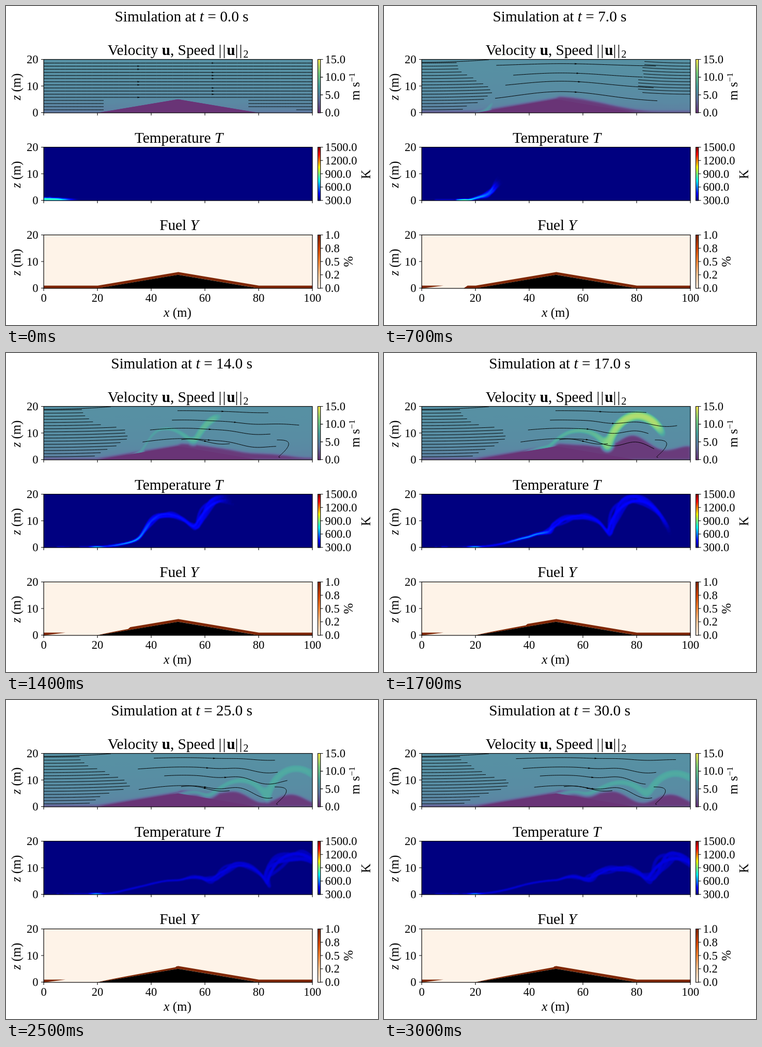
Write an HTML page with a canvas that moves like this. It is 720 by 618 pixels and loops after 3100 ms.

```html
<!DOCTYPE html>
<html lang="en">
<head>
<meta charset="utf-8">
<title>Fire simulation</title>
<style>
html, body { margin: 0; width: 100%; height: 100%; overflow: hidden; background: #fff; }
canvas, svg { position: absolute; left: 0; top: 0; width: 720px; height: 618px; }
text { font: 22.5px "Liberation Serif", "Times New Roman", serif; }
.big { font-size: 29.3px; }
.unit { font-size: 25px; }
.it { font-style: italic; }
.bold { font-weight: bold; }
.bars { letter-spacing: 2px; }
</style>
</head>
<body>
<canvas id="view" width="720" height="618"></canvas>
<svg id="chart" viewBox="0 0 720 618" text-anchor="middle"></svg>
<script>
const L = 73, W = 520, H = 103, TOPS = [104, 274, 444], STEP = 100, STEPS = 31;
const MAPS = {
  viridis: [[68, 1, 84], [59, 82, 139], [33, 145, 140], [94, 201, 98], [253, 231, 37]],
  jet: [[0, 0, 128], [0, 0, 255], [0, 128, 255], [0, 255, 255], [128, 255, 128],
        [255, 255, 0], [255, 128, 0], [255, 0, 0], [128, 0, 0]],
  oranges: [[254, 243, 232], [253, 208, 162], [253, 141, 60], [217, 72, 1], [127, 39, 4]]
};

const clamp = (v, a = 0, b = 1) => Math.min(b, Math.max(a, v));
const mix = (a, b, f) => a + (b - a) * f;
const smooth = v => (v = clamp(v), v * v * (3 - 2 * v));
const bell = (v, mid, width) => Math.exp(-(((v - mid) / width) ** 2));
const rand = (...seed) => {
  const v = Math.sin(seed.reduce((s, n) => s * 7.13 + n * 12.99, 1)) * 43758.5;
  return v - Math.floor(v);
};
// metres to panel pixels
const px = x => x * W / 100, py = z => H - z * H / 20;

function shade(map, v) {
  const n = map.length - 1, i = Math.min(v * n | 0, n - 1);
  return map[i].map((c, j) => mix(c, map[i + 1][j], v * n - i));
}

// --- Model, in metres and seconds ---
const hill = x => 5.1 * clamp(1 - Math.abs(x - 50) / 30);
const fireFront = t => Math.min(3 * t, 4 + 1.7 * t + .022 * t * t, 49.3);
const source = t => Math.min(20, 2 + 2 * t);
const plumeTip = t => 3.4 + 3.23 * t + .103 * t * t;
const phase = (x, t) => 2 * Math.PI * (x - 76 - 4.5 * (t - 21)) / 22;

// A travelling wave grows downwind of the fire front and rolls over
function plume(x, t) {
  const d = x - fireFront(t);
  const young = 1 - smooth((t - 13) / 8);
  const amp = (2.6 * smooth(d / 12) + 4 * smooth((d - 18) / 25)) * (1 - .4 * smooth((t - 22) / 8));
  const rise = (2.2 + 3 * young) * smooth(d / 12) + 2 * smooth((d - 12) / 30);
  const p = phase(x, t);
  return {
    d, x: x + amp * .6 * Math.sin(p),
    z: .2 + 5.2 * smooth((x - 20) / 30) + rise + amp * Math.cos(p)
  };
}

function heat(x, t) {
  const fire = .2 * bell(x, fireFront(t), 7) * (1 - smooth((t - 20) / 4));
  const base = mix(.2, .095, clamp(t / 24));
  return (base + fire + .28 * bell(x, source(t), 2.2)) * smooth((plumeTip(t) - x) / 4);
}

function jet(x, t) {
  const d = x - fireFront(t), gust = bell(t, 17, 3);
  const speed = .38 + .14 * smooth(d / 6) + gust * (.08 * smooth(d / 6) + .25 * smooth((d - 22) / 20));
  return speed * smooth((plumeTip(t) - x) / 5) * smooth((d + 3) / 5);
}

// Top of the slow air: ground layer plus the wake behind the crest
function slowAir(x, t) {
  const grown = smooth(t / 3), late = smooth((t - 13) / 4);
  const wake = 5.6 * (1 - smooth((x - 50) / 38)) * (x > 50);
  const wave = late * smooth((x - 55) / 25) * (2.4 + 1.8 * Math.cos(phase(x + 2, t)));
  const gust = 4 * bell(t, 17, 2.5) * bell(x, 82, 12);
  return Math.max(hill(x), grown * (.5 + Math.max(hill(x), wake) + wave + gust));
}

// --- Scalar fields ---
const layer = () => {
  const c = document.createElement('canvas');
  c.width = W; c.height = H;
  return c.getContext('2d', { willReadFrequently: true });
};
const view = document.getElementById('view').getContext('2d');
const field = layer(), ink = layer();
const gray = v => `rgb(${Array(3).fill(clamp(v) * 255 | 0)})`;
const reset = (c, fill) => { c.fillStyle = fill; c.fillRect(0, 0, W, H); };

function polygon(c, pts) {
  c.beginPath();
  pts.forEach(p => c.lineTo(...p));
  c.fill();
}
const hillShape = [20, 50, 80].map(x => [px(x), py(hill(x))]);

function blend(blur, mode) {
  field.save();
  field.filter = `blur(${blur}px)`;
  field.globalCompositeOperation = mode;
  field.drawImage(ink.canvas, 0, 0);
  field.restore();
}

function colorize(map, alpha, top) {
  const img = field.getImageData(0, 0, W, H), d = img.data;
  const lut = Array.from({ length: 256 }, (_, i) => shade(map, i / 255).map(c => mix(255, c, alpha)));
  for (let i = 0; i < d.length; i += 4) {
    const c = lut[d[i]];
    d[i] = c[0]; d[i + 1] = c[1]; d[i + 2] = c[2];
  }
  view.putImageData(img, L, top);
}

// Strokes from x = a to b; at(x) gives [x, y, level, width] in pixels, brightest wins
function trail(a, b, at) {
  ink.globalCompositeOperation = 'lighten';
  ink.lineCap = 'round';
  let last;
  for (let x = a; x <= b; x += .5) {
    const [X, Y, level, width] = at(x);
    if (last) {
      ink.strokeStyle = gray(level);
      ink.lineWidth = width;
      ink.beginPath(); ink.moveTo(...last); ink.lineTo(X, Y); ink.stroke();
    }
    last = [X, Y];
  }
  ink.globalCompositeOperation = 'source-over';
}

function drawSpeed(t) {
  const g = field.createLinearGradient(0, 0, 0, H), shades = [.39, .38, .36, .32, .26];
  shades.forEach((v, i) => g.addColorStop(1 - (1 - i / 4) ** 2, gray(v)));
  reset(field, g);
  ink.clearRect(0, 0, W, H);
  ink.fillStyle = gray(.03);
  const edge = Array.from({ length: 101 }, (_, x) => [px(x), py(slowAir(x, t))]);
  polygon(ink, [[0, H + 9], ...edge, [W, H + 9]]);
  blend(t ? 2.2 : .4, 'source-over');
  reset(ink, '#000');
  trail(source(t), Math.min(106, plumeTip(t)), x => {
    const p = plume(x, t);
    return [px(p.x), py(p.z) + 5, jet(x, t), 8 + 12 * smooth(p.d / 40)];
  });
  blend(3.5, 'lighten');
  field.fillStyle = '#000';
  polygon(field, hillShape);
  colorize(MAPS.viridis, .8, TOPS[0]);
}

function drawHeat(t) {
  reset(field, '#000');
  reset(ink, '#000');
  const tip = Math.min(108, plumeTip(t));
  for (let k = 0; k < 5; k++) {
    const shift = rand(k) * 6, share = k ? mix(.55, .95, rand(k, 2)) : 1;
    trail(source(t) - 3, tip, x => {
      const p = plume(x, t), w = 1 + 7 * smooth(p.d / 14) + 9 * smooth((p.d - 20) / 30);
      const sway = k ? w * .65 * Math.sin(x * .45 - t * 2 + shift) : 0;
      return [px(p.x) + sway * .7, py(p.z) + sway, heat(x, t) * share, 2 + w * .25];
    });
  }
  if (t < 3) trail(0, 14, x => [px(x), H, .45 * (1 - t / 3) * (1 - smooth((x - 4) / 10)), 11 - x * .4]);
  else trail(5, source(t), x => [px(x), H - 1, .12 * rand(x >> 1, t), 2.5]);
  blend(1.3, 'lighten');
  colorize(MAPS.jet, 1, TOPS[1]);
}

function drawFuel(t) {
  const top = TOPS[2], depth = 5.3, front = fireFront(t);
  view.fillStyle = `rgb(${MAPS.oranges[0]})`;
  view.fillRect(L, top, W, H);
  view.fillStyle = `rgb(${MAPS.oranges[4]})`;
  for (let i = 0; i < W; i++) {
    const x = i * 100 / W, ground = py(hill(x));
    let low = 0, high = depth;
    if (x < front) {
      const left = x < 20 ? 0 : .75 * Math.sqrt(clamp((x - 20) / 30));
      if (x < 8) low = depth * x / 8;
      else high = depth * Math.max(left, 1 - (front - x) / 1.5);
    }
    if (high > low) view.fillRect(L + i, top + ground - high, 1, high - low);
  }
  view.fillStyle = '#000';
  polygon(view, hillShape.map(([x, y]) => [x + L, y + top]));
}

// --- Streamlines ---
function head(x, y, angle = 0) {
  view.save();
  view.translate(x, y);
  view.rotate(angle);
  polygon(view, [[-2.5, -1.5], [2, 0], [-2.5, 1.5]]);
  view.restore();
}

// pos(u) is in metres
function stream(pos, arrow) {
  const at = u => { const [x, z] = pos(u); return [px(x), py(z)]; };
  view.beginPath();
  for (let i = 0; i <= 50; i++) view.lineTo(...at(i / 50));
  view.stroke();
  if (arrow) {
    const a = at(.48), b = at(.5);
    head(...b, Math.atan2(b[1] - a[1], b[0] - a[0]));
  }
}

function drawRows(t) {
  for (let row = 0; row < 16; row++) {
    const z = 1.15 + row * 1.172, jitter = rand(row >> 1, Math.round(t / 4));
    const run = (a, b, bend) => stream(u => {
      const x = mix(a, b, u);
      return [x, z + bend * (x - a) ** 2];
    });
    if (!t) {
      if (row > 3) {
        run(0, 100, 0);
        head(row % 5 > 2 ? 184 : 328, py(z));
      } else {
        run(0, 22.3, 0);
        run(row ? 76.2 : 94, 100, 0);
      }
      continue;
    }
    const grow = smooth((t - 3) / 6);
    run(0, mix(14 - row * .5, 12 + 18 * bell(row, 6, 4.5), grow) + 4 * jitter * grow, .0008);
    if (row > (t - 4) * 1.4 && t < 14) run(100, 80 + 4 * jitter, .002);
  }
}

function drawBends(t) {
  const seed = Math.round(t / 4), late = smooth((t - 12) / 5), aft = smooth((t - 4) / 6);
  stream(u => [25 * u, 19 + u * u]);
  [18.5, 15, 11.9, 8].forEach((z, j) => {
    const a = mix(21, 50, aft * (.35 + .65 * rand(j, seed))), b = mix(82, 98, aft * rand(seed, j));
    stream(u => {
      const x = mix(a, b, u), sway = .22 * late * smooth((x - 55) / 25) * (20 - z) * Math.cos(phase(x, t)) * .6;
      const flow = 5 * bell(x, 52, 24);
      return [x, z + (flow - 5) * clamp((22 - z) / 18) + sway];
    }, true);
  });
  if (t < 14) return;
  const x0 = 50 + 4 * rand(seed), eye = 84 + 10 * rand(seed, 3);
  stream(u => [x0 + 18 * u, 7.6 - 1.4 * smooth(u) + .4 * Math.sin(6 * u)], true);
  stream(u => [eye + 3 * Math.sin(5 * u) + 4 * u, 7.5 - 6.3 * u + Math.sin(6 * u)]);
}

function drawStreams(t) {
  view.save();
  view.translate(L, TOPS[0]);
  view.beginPath();
  view.rect(0, 0, W, H);
  view.clip();
  view.strokeStyle = view.fillStyle = '#000';
  view.lineWidth = .95;
  drawRows(t);
  if (t) drawBends(t);
  view.restore();
}

// --- Axes, labels and colour bars ---
const it = s => `<tspan class="it">${s}</tspan>`, bold = s => `<tspan class="bold">${s}</tspan>`;
const norm = '<tspan class="bars">||</tspan>';
const label = (x, y, s, more = '') => `<text x="${x}" y="${y}" ${more}>${s}</text>`;
const upright = (x, y, s) => label(0, 0, s, `class="unit" transform="translate(${x} ${y}) rotate(-90)"`);
const big = 'class="big"';
const bars = [['viridis', .8, ['15.0', '10.0', '5.0', '0.0']],
  ['jet', 1, ['1500.0', '1200.0', '900.0', '600.0', '300.0']],
  ['oranges', 1, ['1.0', '0.8', '0.5', '0.2', '0.0']]];
let svg = label(340, 30, '', big + ' id="clock"')
  + label(333, 95, `Velocity ${bold('u')}, Speed ${norm}${bold('u')}${norm}<tspan font-size="20" dy="5">2</tspan>`, big)
  + label(334.5, 265, `Temperature ${it('T')}`, big) + label(335, 434, `Fuel ${it('Y')}`, big)
  + label(332, 602, `${it('x')} (m)`, 'class="unit"')
  + upright(684, 156, 'm s<tspan font-size="17" dy="-9">−1</tspan>')
  + upright(705, 326, 'K') + upright(671, 495, '%');
let ticks = '';
bars.forEach(([name, alpha, names], k) => {
  const top = TOPS[k] - .5, map = MAPS[name];
  const stops = map.map((c, i) => `<stop offset="${1 - i / (map.length - 1)}" stop-color="rgb(${c})"/>`).reverse().join('');
  svg += `<linearGradient id="${name}" x2="0" y2="1">${stops}</linearGradient>`
    + `<rect x="603.5" y="${top}" width="5.2" height="${H + .5}" fill="url(#${name})" fill-opacity="${alpha}" stroke="#000" stroke-width="1.1"/>`
    + `<rect x="${L}" y="${top}" width="${W}" height="${H + .5}" fill="none" stroke="#000" stroke-width="1.2"/>`
    + upright(28, top + 53, `${it('z')} (m)`);
  names.forEach((s, i) => {
    const y = top + i * H / (names.length - 1);
    ticks += `M608.5 ${y}h5`;
    svg += label(617.5, y + 7.5, s, 'text-anchor="start"');
  });
  [20, 10, 0].forEach((v, i) => {
    ticks += `M${L} ${top + i * H / 2}h-5`;
    svg += label(62.5, top + i * H / 2 + 7.5, v, 'text-anchor="end"');
  });
  for (let v = 0; v <= 100; v += 20) {
    ticks += `M${L + px(v)} ${top + H + .5}v5`;
    if (k === 2) svg += label(L + px(v), 573, v);
  }
});
document.getElementById('chart').innerHTML = svg + `<path d="${ticks}" stroke="#000" stroke-width="1.1"/>`;
const clock = document.getElementById('clock');

function draw(t) {
  drawSpeed(t);
  drawStreams(t);
  drawHeat(t);
  drawFuel(t);
  clock.innerHTML = `Simulation at ${it('t')} = ${t.toFixed(1)} s`;
}

let shown = -1;
const start = performance.now();
function tick(now) {
  const t = Math.floor(Math.max(0, now - start) / STEP) % STEPS;
  if (t !== shown) draw(shown = t);
  requestAnimationFrame(tick);
}
tick(start);
</script>
</body>
</html>
```
